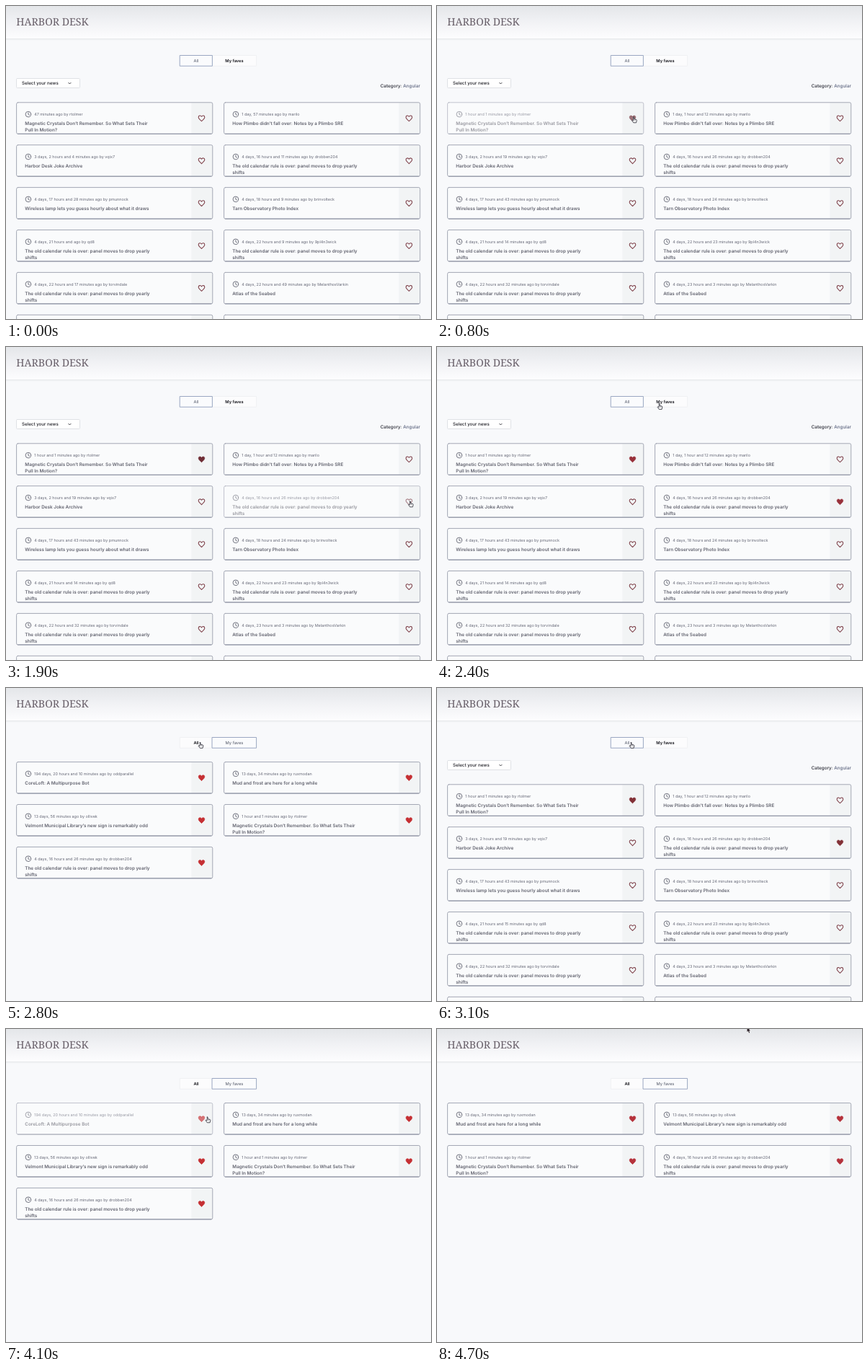
Recreate the animation shown at these times as an HTML page with a canvas. Size 590 px wide and 434 px high, loop 5.5 s.

```html
<!DOCTYPE html>
<html lang="en">
<head>
<meta charset="utf-8">
<title>Harbor Desk</title>
<style>
html, body { margin: 0; width: 100%; height: 100%; overflow: hidden; background: #f8f9fb; }
canvas { display: block; width: 590px; height: 434px; }
</style>
</head>
<body>
<canvas id="stage" width="590" height="434"></canvas>
<script>
const W = 590, H = 434, LOOP = 5500, STEP = 100;
const ctx = document.getElementById('stage').getContext('2d');
ctx.textRendering = 'geometricPrecision';
const SANS = 'Inter, Roboto, sans-serif';
const SERIF = '"Noto Serif", "Liberation Serif", serif';
const CARD = { w: 272.2, h: 43.5, pitch: 58.9, xs: [14.6, 302.6], heart: 242.8 };
const TABS = { y: 68.5, h: 14.7, split: 286.4, left: 241.6, right: 347.6 };

// age in minutes, user, title lines
const story = (age, user, ...lines) => ({ age, user, lines });
const ruling = ['The old calendar rule is over: panel moves to drop yearly', 'shifts'];
const news = [
  story(47.2, 'rtolmer', 'Magnetic Crystals Don’t Remember. So What Sets Their', 'Pull In Motion?'),
  story(1497.7, 'marilo', 'How Plimbo didn’t fall over: Notes by a Plimbo SRE'),
  story(4444.7, 'vqix7', 'Harbor Desk Joke Archive'),
  story(6731.7, 'drobben204', ...ruling),
  story(6808.7, 'pmunnock', 'Wireless lamp lets you guess hourly about what it draws'),
  story(6849.7, 'brinvolteck', 'Tarn Observatory Photo Index'),
  story(7020.4, 'qd8', ...ruling),
  story(7089.2, '9pl4n3wick', ...ruling),
  story(7097.7, 'torvindale', ...ruling),
  story(7129.2, 'MelanthosVarkin', 'Atlas of the Seabed'),
  null, null
];
const faves = [
  story(280555.7, 'oddparallel', 'CoreLoft: A Multipurpose Bot'),
  story(18739.7, 'ruxmodan', 'Mud and frost are here for a long while'),
  story(18761.7, 'ollivek', 'Velmont Municipal Library’s new sign is remarkably odd'),
  news[0], news[3]
];

// pointer path: time, x, y
const path = [
  [100, 330, 285], [400, 274, 158], [900, 274, 158], [1200, 440, 232],
  [1300, 552, 262], [1400, 581.5, 248.5], [1500, 582, 244], [1600, 580, 236],
  [1900, 562, 218], [2100, 562, 218], [2200, 470, 165], [2400, 309.5, 82.6],
  [2600, 312, 81], [2700, 303, 80], [2800, 270.5, 79.5], [3600, 270.5, 79.5],
  [3700, 298.3, 81], [3800, 306, 80], [3900, 306, 82], [4000, 284, 112],
  [4100, 280.5, 126], [4200, 280.5, 126], [4700, 432.5, 1.5]
];

function pointerAt(t) {
  if (t < path[0][0]) return null;
  const i = path.findIndex(p => p[0] > t);
  if (i < 0) return path[path.length - 1].slice(1);
  const [t0, x0, y0] = path[i - 1], [t1, x1, y1] = path[i];
  const k = (t - t0) / (t1 - t0);
  return [x0 + (x1 - x0) * k, y0 + (y1 - y0) * k];
}

function sceneAt(t) {
  const onFaves = (t >= 2700 && t < 3100) || t >= 3900;
  const list = !onFaves ? news : t >= 4200 ? faves.slice(1) : faves;
  const liked = s => onFaves || (s === news[0] && t >= 700) || (s === news[3] && t >= 2000);
  let red = '#6f2d35';
  if (t >= 2000) red = '#98303a';
  if (t >= 2700) red = '#c52f33';
  if (t >= 3100) red = '#823036';
  if (t >= 3900) red = '#c52f33';
  if (t >= 4300) red = '#b5323b';
  const offset = t < 100 ? 0 : t < 3100 ? 14.5 : 14.7;
  return { onFaves, list, liked, red, offset, top: onFaves ? 102.6 : 133.8 };
}

function ago(age) {
  const m = Math.floor(age), d = Math.floor(m / 1440), h = Math.floor(m / 60) % 24;
  const unit = (n, name) => `${n} ${name}${n > 1 ? 's' : ''}`;
  return (d ? unit(d, 'day') + ', ' : '') + (h ? unit(h, 'hour') + ' and ' : '') +
    (m % 60 ? `${m % 60} minutes ` : '') + 'ago';
}

function text(str, x, y, size, color, weight = 400, align = 'left', family = SANS) {
  ctx.font = `${weight} ${size}px ${family}`;
  ctx.fillStyle = color;
  ctx.textAlign = align;
  ctx.fillText(str, x, y);
}

function box(x, y, w, h, r, fill, stroke) {
  ctx.beginPath();
  ctx.roundRect(x, y, w, h, r);
  if (fill) { ctx.fillStyle = fill; ctx.fill(); }
  if (stroke) { ctx.strokeStyle = stroke; ctx.lineWidth = 1; ctx.stroke(); }
}

function poly(points, close) {
  ctx.beginPath();
  points.forEach(([x, y]) => ctx.lineTo(x, y));
  if (close) ctx.closePath();
}

function heart(x, y, filled, color) {
  ctx.beginPath();
  for (const s of [-1, 1]) {
    ctx.moveTo(x, y + 3.9);
    ctx.bezierCurveTo(x + s * 2.8, y + 1.5, x + s * 4.3, y + 0.2, x + s * 4.3, y - 1.6);
    ctx.bezierCurveTo(x + s * 4.3, y - 4.2, x + s * 1.3, y - 4.5, x, y - 2.5);
  }
  ctx.fillStyle = ctx.strokeStyle = color;
  ctx.lineWidth = filled ? 0.6 : 1.05;
  ctx.lineJoin = ctx.lineCap = 'round';
  if (filled) ctx.fill();
  ctx.stroke();
}

function clock(x, y) {
  ctx.strokeStyle = '#5c5e6c';
  ctx.lineWidth = 0.85;
  ctx.beginPath();
  ctx.arc(x, y, 3.8, 0, Math.PI * 2);
  ctx.stroke();
  poly([[x, y - 2.2], [x, y + 0.2], [x + 1.7, y + 1.2]]);
  ctx.stroke();
}

const slot = (i, top) => [CARD.xs[i % 2], top + Math.floor(i / 2) * CARD.pitch];
const inside = (p, x, y, w, h) => p && p[0] >= x && p[0] <= x + w && p[1] >= y && p[1] <= y + h;

function drawCard(s, i, scene, dim) {
  const [x, y] = slot(i, scene.top);
  box(x, y, CARD.w, CARD.h, 2, '#fafbfc');
  box(x + CARD.heart, y, CARD.w - CARD.heart, CARD.h, [0, 2, 2, 0], '#f2f4f5');
  ctx.globalAlpha = dim ? 0.65 : 1;
  box(x, y, CARD.w, CARD.h, 2, null, '#a3a7b4');
  ctx.fillStyle = '#8d92a2';
  ctx.fillRect(x + 1.5, y + CARD.h - 0.5, CARD.w - 3, 1);
  if (s) {
    clock(x + 16.3, y + 16.3);
    text(`${ago(s.age + scene.offset)} by ${s.user}`, x + 24.6, y + 18.2, 5.45, '#656776');
    s.lines.forEach((line, n) => text(line, x + 11.7, y + 31.2 + n * 9, 6.35, '#62636f', 600));
    const on = scene.liked(s);
    heart(x + 256.9, y + 22, on, on ? scene.red : '#7c3d46');
  }
  ctx.globalAlpha = 1;
}

function drawHeader() {
  const g = ctx.createLinearGradient(0, 0, 0, 45);
  g.addColorStop(0, '#e4e6e9');
  g.addColorStop(0.45, '#f0f1f4');
  g.addColorStop(1, '#fdfdfe');
  ctx.fillStyle = g;
  ctx.fillRect(0, 0, W, 45);
  ['#e8eaec', '#f0f2f3', '#f5f6f8'].forEach((c, i) => {
    ctx.fillStyle = c;
    ctx.fillRect(0, 45 + i, W, 1);
  });
  text('HARBOR DESK', 14.3, 27.4, 14.2, '#675e68', 500, 'left', SERIF);
}

function drawTab(label, x, w, active) {
  box(x, TABS.y, w, TABS.h, 0, active ? '#fafbfd' : '#fcfcfd', active ? '#9ba7c2' : '#f0f1f3');
  text(label, x + w / 2, 78, 5.75, active ? '#525868' : '#16161c', active ? 400 : 600, 'center');
}

function drawTabs(onFaves) {
  const tabs = [
    ['All', TABS.left, TABS.split - TABS.left, !onFaves],
    ['My faves', TABS.split, TABS.right - TABS.split, onFaves]
  ];
  tabs.sort((a, b) => a[3] - b[3]).forEach(tab => drawTab(...tab));
}

function drawFilter() {
  box(14.5, 100.5, 88, 13, 1, '#ffffff', '#dfe1e5');
  text('Select your news', 22, 109.1, 6.2, '#1d1d24', 500);
  poly([[86.8, 106.4], [88.4, 108], [90, 106.4]]);
  ctx.strokeStyle = '#2a2a32';
  ctx.lineWidth = 0.9;
  ctx.stroke();
  text('Angular', 575, 112.8, 6.35, '#5f6780', 500, 'right');
  const w = ctx.measureText(' Angular').width;
  text('Category:', 575 - w, 112.8, 6.35, '#2b2c36', 500, 'right');
}

function drawPointer([x, y], hand) {
  ctx.save();
  ctx.translate(x, y);
  ctx.lineJoin = 'round';
  if (hand) {
    poly([[-1.6, -4], [-0.5, -4], [-0.3, -1.2], [2.8, -0.5], [3.3, 0.3], [2.6, 3.8],
      [-1.2, 3.8], [-3.4, 0.7], [-2.8, 0], [-1.6, 0.8]], true);
    ctx.fillStyle = '#ffffff';
    ctx.strokeStyle = '#3a3a44';
    ctx.lineWidth = 0.9;
    ctx.fill();
    ctx.stroke();
    poly([[0.9, -0.6], [0.9, 1.2]]);
    ctx.lineWidth = 0.5;
    ctx.stroke();
  } else {
    poly([[-2, -4], [-2, 2.6], [-0.5, 1.3], [0.6, 3.9], [1.7, 3.4], [0.6, 0.9], [2.6, 0.8]], true);
    ctx.strokeStyle = '#ffffff';
    ctx.lineWidth = 1;
    ctx.stroke();
    ctx.fillStyle = '#2a2027';
    ctx.fill();
  }
  ctx.restore();
}

function draw(t) {
  const scene = sceneAt(t), pointer = pointerAt(t), trail = pointerAt(t - STEP);
  ctx.fillStyle = '#f8f9fb';
  ctx.fillRect(0, 0, W, H);
  drawHeader();
  drawTabs(scene.onFaves);
  if (!scene.onFaves) drawFilter();

  let hand = inside(pointer, TABS.left, TABS.y, TABS.right - TABS.left, TABS.h);
  scene.list.forEach((s, i) => {
    const [x, y] = slot(i, scene.top);
    // the hover fade trails the pointer by one step
    drawCard(s, i, scene, inside(trail, x, y, CARD.w, CARD.h));
    hand = hand || inside(pointer, x + CARD.heart, y, CARD.w - CARD.heart, CARD.h);
  });
  if (pointer) drawPointer(pointer, hand);
}

const start = performance.now();
function tick() {
  const t = (performance.now() - start) % LOOP;
  draw(Math.floor(t / STEP) * STEP);
  requestAnimationFrame(tick);
}
tick();
</script>
</body>
</html>
```
